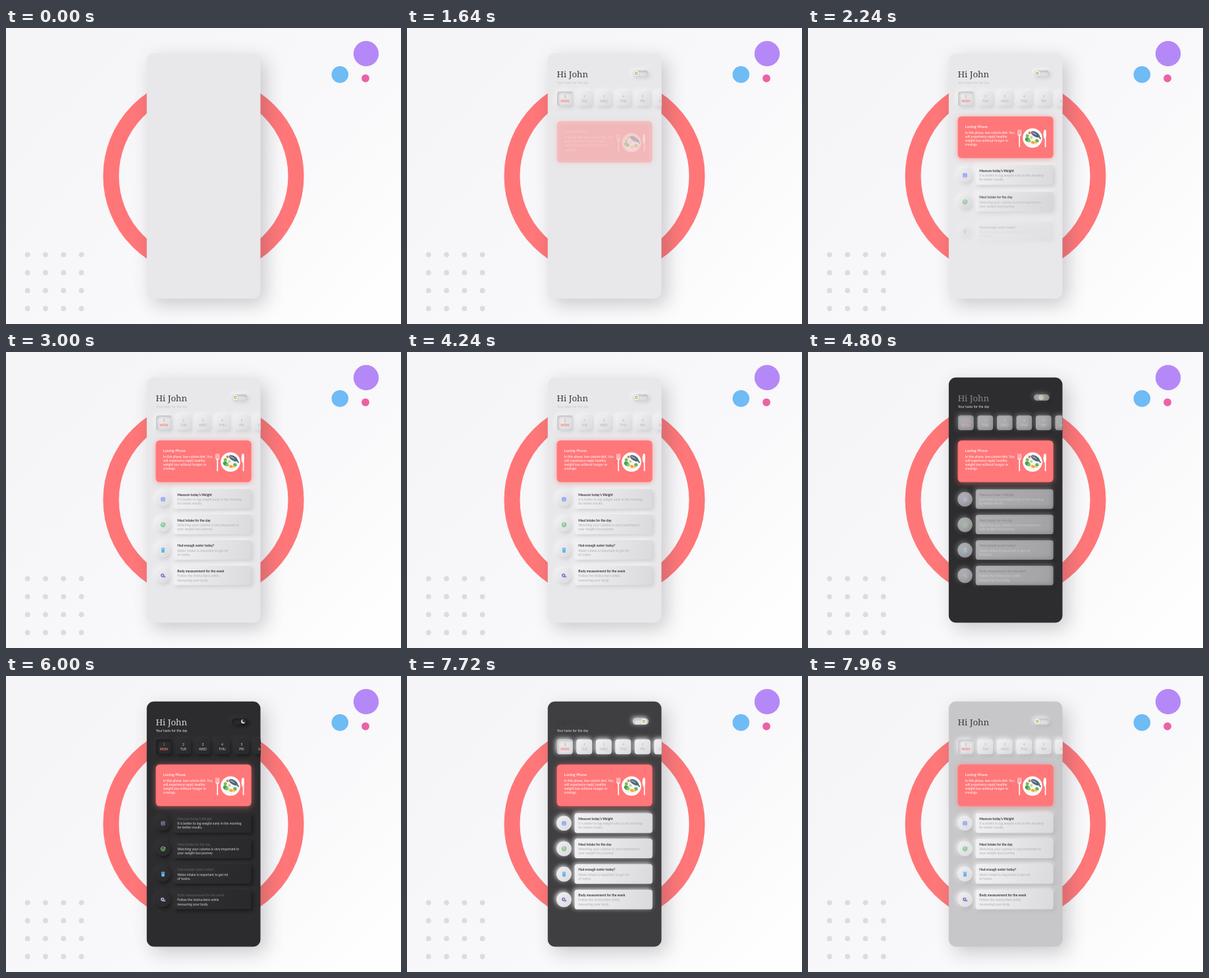
Recreate the animation shown at these times as an HTML page with a canvas. Size 600 px wide and 450 px high, loop 8 s.

```html
<!DOCTYPE html>
<html lang="en">
<head>
<meta charset="utf-8">
<title>Diet app theme switch</title>
<style>
html, body { margin: 0; width: 100%; height: 100%; overflow: hidden; background: #f7f6f9; }
canvas { display: block; }
</style>
</head>
<body>
<canvas id="stage" width="600" height="450"></canvas>
<script>
const ctx = document.getElementById('stage').getContext('2d');
const LOOP = 8000;
const SANS = 'Lato, sans-serif';
const SERIF = '"Noto Serif", serif';
const RED = '#ff7678';

const LIGHT = {
  fill: ['#f1f0f3', '#dad9dc'], glow: 'rgba(255,255,255,.95)', shade: 'rgba(60,60,70,.2)',
  inset: 'rgba(90,90,100,.4)', title: '#3b3a3e', day: '#b4b3b7', heading: '#39383c', body: '#b1b0b4',
  icons: ['#8b9cf4', '#58bd66', '#58b5ef', '#9273c7'], mark: '#efeef2'
};
const DARK = {
  fill: ['#303032', '#29292b'], glow: 'rgba(68,68,71,.6)', shade: 'rgba(0,0,0,.6)',
  inset: 'rgba(0,0,0,.6)', title: '#d6d5d8', day: '#d6d5d8', heading: '#59585b', body: '#d6d5d8',
  icons: ['#77728f', '#82c77d', '#62b8e8', '#b8a5ca'], mark: '#313034'
};

const DAYS = ['MON', 'TUE', 'WED', 'THU', 'FRI', 'SAT'];
const TASKS = [
  ['Measure today’s Weight', 'It is better to log weight early in the morning', 'for better results.'],
  ['Meal Intake for the day', 'Watching your calories is very important in', 'your weight loss journey'],
  ['Had enough water today?', 'Water intake is important to get rid', 'of toxins.'],
  ['Body measurement for the week', 'Follow the instructions while', 'measuring your body.']
];
const PHASE = ['In this phase, low-calorie diet. You', 'will experience rapid, healthy',
  'weight loss without hunger or', 'cravings.'];

const mix = (a, b, p) => a + (b - a) * p;
const mixColor = (a, b, p) => `rgb(${a.map((v, i) => Math.round(mix(v, b[i], p)))})`;

function ease(t, start, duration) {
  const x = Math.min(1, Math.max(0, (t - start) / duration));
  return x < .5 ? 4 * x ** 3 : 1 - 4 * (1 - x) ** 3;
}

// Draws with a temporary opacity and vertical offset.
function group(alpha, dy, draw) {
  if (alpha <= 0) return;
  ctx.save();
  ctx.globalAlpha *= alpha;
  ctx.translate(0, dy);
  draw();
  ctx.restore();
}

function shadow(color, x = 0, y = 0, blur = 0) {
  ctx.shadowColor = color;
  ctx.shadowOffsetX = x;
  ctx.shadowOffsetY = y;
  ctx.shadowBlur = blur;
}
const noShadow = () => shadow('transparent');

function roundRect(x, y, w, h, r) {
  ctx.beginPath();
  ctx.roundRect(x, y, w, h, r);
}

function ellipse(x, y, rx, ry, color, angle = 0) {
  ctx.beginPath();
  ctx.ellipse(x, y, rx, ry, angle, 0, Math.PI * 2);
  ctx.fillStyle = color;
  ctx.fill();
}
const circle = (x, y, r, color) => ellipse(x, y, r, r, color);

function line(points, color, width) {
  ctx.beginPath();
  points.forEach(([x, y]) => ctx.lineTo(x, y));
  ctx.strokeStyle = color;
  ctx.lineWidth = width;
  ctx.lineCap = 'round';
  ctx.stroke();
}

function text(str, x, y, font, color, align = 'left') {
  ctx.font = font;
  ctx.fillStyle = color;
  ctx.textAlign = align;
  ctx.fillText(str, x, y);
}

function gradient(x, y, w, h, colors) {
  const g = ctx.createLinearGradient(x, y, x + w, y + h);
  g.addColorStop(0, colors[0]);
  g.addColorStop(1, colors[1]);
  return g;
}

function raised(x, y, w, h, r, theme) {
  roundRect(x, y, w, h, r);
  ctx.fillStyle = gradient(x, y, w, h, theme.fill);
  shadow(theme.glow, -1.5, -1.5, 7);
  ctx.fill();
  shadow(theme.shade, 2, 2, 6);
  ctx.fill();
  noShadow();
}

function sunken(x, y, w, h, r, theme) {
  raised(x, y, w, h, r, theme);
  ctx.save();
  roundRect(x, y, w, h, r);
  ctx.clip();
  roundRect(x - 2, y - 2, w + 4, h + 4, r + 2);
  ctx.strokeStyle = theme.fill[1];
  ctx.lineWidth = 4;
  shadow(theme.inset, 1.5, 1.5, 4);
  ctx.stroke();
  ctx.restore();
}

function backdrop() {
  const g = ctx.createLinearGradient(100, 50, 520, 450);
  g.addColorStop(0, '#f5f4f7');
  g.addColorStop(.6, '#f9f8fa');
  g.addColorStop(1, '#fefefe');
  ctx.fillStyle = g;
  ctx.fillRect(0, 0, 600, 450);
  for (let i = 0; i < 16; i++) {
    circle(32.7 + (i % 4) * 27.3, 344.6 + Math.floor(i / 4) * 27.3, 3.9, '#dcdbde');
  }
  circle(547, 39, 19.2, '#b588f7');
  circle(507.3, 70.8, 12.8, '#6ebbf6');
  circle(546, 76.5, 5.9, '#ec61a6');
  ctx.beginPath();
  ctx.arc(300, 225, 140.5, 0, Math.PI * 2);
  ctx.strokeStyle = RED;
  ctx.lineWidth = 24;
  ctx.stroke();
}

function phoneShape() {
  roundRect(213.8, 38.8, 172.7, 372.7, 11);
}

function toggle(theme, slide) {
  const x = mix(348.2, 360.3, slide);
  sunken(343.3, 64.5, 23.2, 9.3, 4.65, theme);
  ctx.fillStyle = theme.fill[0];
  shadow(theme.shade, .5, .5, 2);
  ctx.beginPath();
  ctx.arc(x, 69.1, 4.4, 0, Math.PI * 2);
  ctx.fill();
  noShadow();
  if (theme === LIGHT) {
    circle(x, 69.1, 2.3, '#a9b84f');
    circle(x, 69.1, 1.2, '#fbf3b5');
  } else {
    circle(x, 69.1, 3.1, '#e9e8eb');
    circle(x + 1.3, 68, 2.6, theme.fill[0]);
  }
}

function days(theme) {
  DAYS.forEach((name, i) => {
    const x = 228 + i * 29.5;
    (i ? raised : sunken)(x, 96.4, 23.6, 22.4, 4, theme);
    text(i + 1, x + 11.9, 105.7, `5px ${SANS}`, i ? theme.day : '#c98184', 'center');
    text(name, x + 11.9, 113.4, `${i ? '' : 'bold '}5px ${SANS}`, i ? theme.day : RED, 'center');
  });
}

const ICONS = [
  (color, mark) => {
    roundRect(-3.2, -3.2, 6.4, 6.4, 1.4);
    ctx.fillStyle = color;
    ctx.fill();
    line([[-1.7, -.7], [0, -1.5], [1.7, -.7]], mark, .8);
    line([[-1.6, 1.6], [1.6, 1.6]], mark, .7);
  },
  (color) => {
    ctx.beginPath();
    ctx.arc(0, 0, 3, -.2, Math.PI * 1.75);
    ctx.strokeStyle = color;
    ctx.lineWidth = 1.1;
    ctx.stroke();
    line([[-1.4, -.1], [-.2, 1.1], [3, -2.2]], color, 1.1);
  },
  (color, mark) => {
    ctx.beginPath();
    [[-2.8, -3.6], [2.8, -3.6], [2, 3.6], [-2, 3.6]].forEach(p => ctx.lineTo(...p));
    ctx.fillStyle = color;
    ctx.fill();
    line([[-2, -2], [0, -1.5], [2, -2]], mark, .7);
  },
  (color, mark) => {
    circle(-.8, -.6, 2.7, color);
    circle(-.8, -.6, 1, mark);
    roundRect(-.8, .4, 4.4, 2.5, .5);
    ctx.fillStyle = color;
    ctx.fill();
    line([[.8, 1.6], [.8, 2.5]], mark, .5);
    line([[2.2, 1.6], [2.2, 2.5]], mark, .5);
  }
];

function task(theme, i) {
  const y = 208.8 + i * 38.7;
  const [heading, ...body] = TASKS[i];
  raised(227.3, y + 3.9, 22.4, 22.4, 11.2, theme);
  ctx.save();
  ctx.translate(238.5, y + 15.2);
  ICONS[i](theme.icons[i], theme.mark);
  ctx.restore();
  raised(254.8, y, 117.8, 29.6, 3.6, theme);
  text(heading, 260.2, y + 10.2, `bold 4.9px ${SANS}`, theme.heading);
  body.forEach((str, n) => text(str, 260.2, y + 17.3 + n * 6.3, `5px ${SANS}`, theme.body));
}

function meal() {
  line([[321.2, 163], [321.2, 180.5]], '#fff', 1.7);
  [-2.2, 0, 2.2].forEach(dx => line([[321.2 + dx, 155], [321.2 + dx, 161.5]], '#fff', .9));
  line([[319, 162], [321.2, 164.2], [323.4, 162]], '#fff', 1.3);
  line([[360.6, 155.5], [360.6, 180.5]], '#fff', 1.7);
  ellipse(359.7, 161.5, 2.1, 7, '#fff');

  circle(341, 167.3, 14.8, '#fff');
  circle(341, 167.3, 11.9, '#f2f4f3');
  ellipse(345.3, 161.6, 7.4, 3.5, '#536579', .55);
  ellipse(343.8, 160.4, 4.3, 1.1, '#91a5b5', .55);
  line([[350.5, 163.7], [353, 168]], '#536579', 1.8);
  circle(336.5, 159.4, 1.9, '#e67b4d');
  circle(333.2, 164, 2.4, '#78b957');
  ellipse(333.4, 169.8, 3.9, 3, '#4b9e4f', .6);
  circle(336, 171.5, 2.4, '#8ac85c');
  circle(339.3, 166.4, 1.9, '#b3d780');
  ellipse(341.8, 174, 3, 2.2, '#f6a43b', .3);
  circle(347.8, 171.6, 2.7, '#67b35a');
  circle(346.3, 174.3, 1.6, '#f3c64f');
}

function phaseCard() {
  roundRect(227.6, 134.5, 145, 63.3, 5.5);
  ctx.fillStyle = '#ff7779';
  shadow('rgba(255,118,120,.65)', 0, 1, 9);
  ctx.fill();
  noShadow();
  text('Losing Phase', 238.8, 152.2, `500 6px ${SANS}`, '#fff');
  PHASE.forEach((str, i) => text(str, 238.8, 160.7 + i * 6.25, `5px ${SANS}`, '#fff'));
  meal();
}

function themed(theme, t, slide) {
  const rise = (start, duration, draw) => {
    const p = ease(t, start, duration);
    group(p, 10 * (1 - p), draw);
  };
  rise(0, 560, () => text('Hi John', 227.4, 75, `13.3px ${SERIF}`, theme.title));
  rise(160, 560, () => toggle(theme, slide));
  rise(640, 560, () => days(theme));
  TASKS.forEach((_, i) => rise(1720 + i * 160, 560, () => task(theme, i)));
}

function render(t) {
  const dim = ease(t, 4200, 680) - ease(t, 7520, 680);
  const swap = ease(t, 4540, 460) - ease(t, 7520, 180);
  const slide = ease(t, 4560, 480) - ease(t, 7640, 360);

  backdrop();
  phoneShape();
  ctx.fillStyle = mixColor([232, 231, 233], [44, 43, 45], dim);
  shadow('rgba(70,65,75,.27)', 8, 9, 28);
  ctx.fill();
  noShadow();

  ctx.save();
  phoneShape();
  ctx.clip();
  const sub = ease(t, 160, 560);
  group(sub, 10 * (1 - sub), () => text('Your tasks for the day', 227.8, 85, `5px ${SANS}`,
    mixColor([199, 198, 201], [224, 223, 226], dim)));
  group(swap, 0, () => themed(DARK, t, slide));
  group(1 - swap, 0, () => themed(LIGHT, t, slide));
  const card = ease(t, 1440, 480);
  group(card, 10 * (1 - card), phaseCard);
  ctx.restore();
}

const origin = performance.now();
function tick() {
  render((performance.now() - origin) % LOOP);
  requestAnimationFrame(tick);
}
tick();
</script>
</body>
</html>
```
